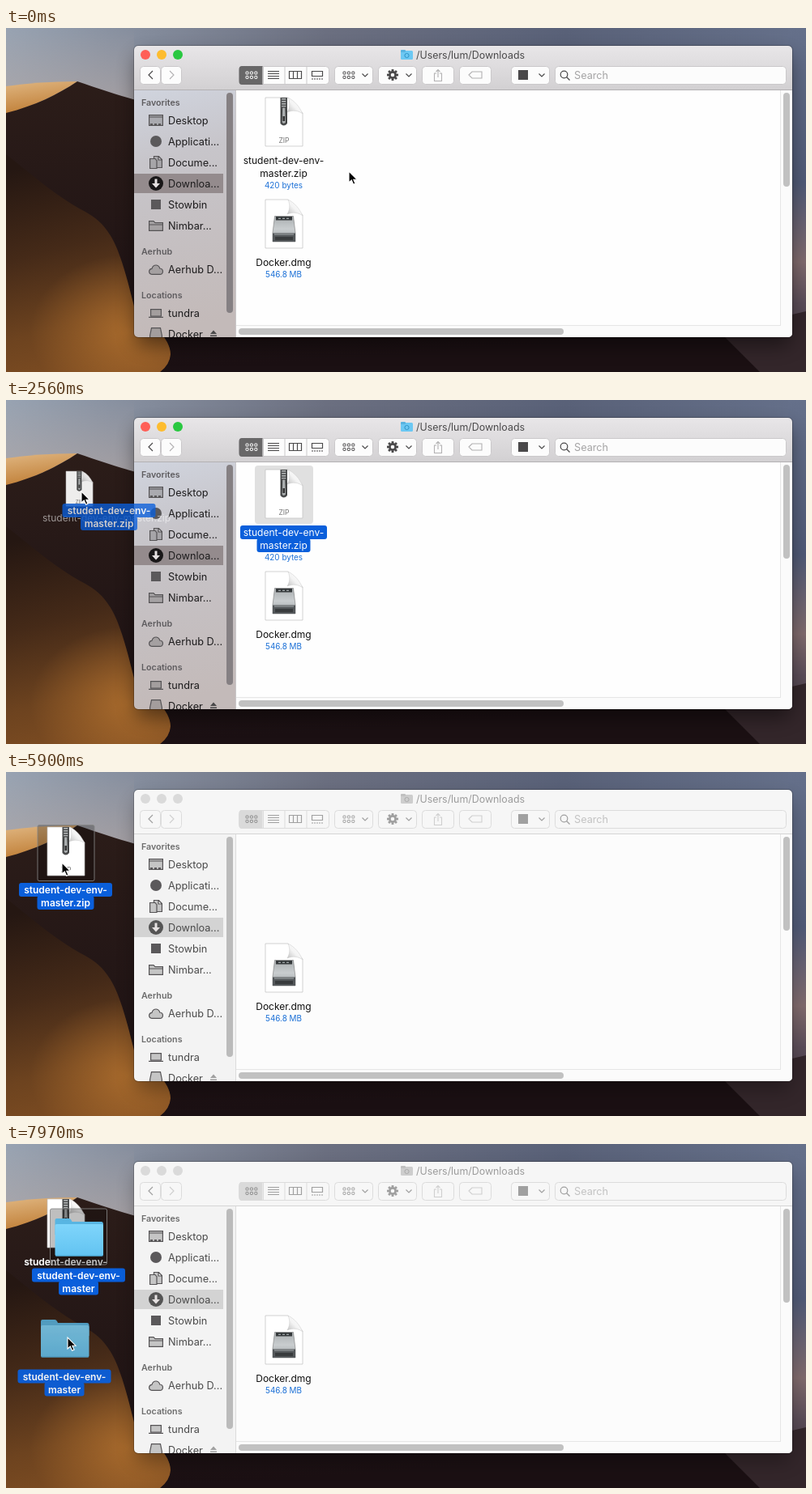
Animation, 987 px wide and 425 px high, one loop 8000 ms. Source, as an HTML page:

```html
<!DOCTYPE html>
<html lang="en">
<head>
<meta charset="utf-8">
<title>Unpacking a zip file</title>
<style>
html, body { margin: 0; width: 100%; height: 100%; overflow: hidden; background: #1c1114; }
svg { display: block; width: 987px; height: 425px; font-family: Inter, "Noto Sans", sans-serif;
  --bar: url(#bar); --line: #b3b1b3; --btn: #fcfcfc; --edge: #cac8ca; --seg: #686768; --segInk: #fff;
  --ink: #4a494a; --dim: #b2b1b2; --title: #4b4a4b; --side: url(#side); --row: #948b8d; --thumb: #858083;
  --item: #1d1c1d; --head: #5e5c5f; --page: #fefefe; --hint: #a5a4a5; }
svg.idle { --bar: #f6f6f6; --line: #d5d5d5; --btn: #f7f7f7; --edge: #dcdcdc; --seg: #dadada; --segInk: #8d8d8d;
  --ink: #a0a0a0; --dim: #cfcfcf; --title: #9c9c9c; --side: #f3f3f3; --row: #d3d3d3; --thumb: #bbb;
  --item: #4b4b4b; --head: #6c6c6c; --page: #fcfcfc; --hint: #c3c3c3; }
.btn { fill: var(--btn); stroke: var(--edge); }
.ink { fill: var(--ink); }
.pen { fill: none; stroke: var(--ink); stroke-width: 1.2; }
.pale { fill: none; stroke: var(--dim); stroke-width: 1.1; }
.item { font-size: 12.7px; fill: var(--item); }
.head { font-size: 10.7px; font-weight: 600; fill: var(--head); }
.glyph { fill: #5b595b; fill-opacity: .3; stroke: #555355; stroke-width: 1.2; }
.solid { fill: #5b595b; }
.name { font-size: 12px; text-anchor: middle; fill: #111; }
.desk { font-size: 12px; font-weight: 600; fill: #fff; }
.info { font-size: 9.9px; text-anchor: middle; fill: #1a6fd6; }
</style>
</head>
<body>
<svg id="stage" viewBox="0 0 987 425">
<defs>
  <linearGradient id="sky"><stop stop-color="#98a3b2"/><stop offset=".18" stop-color="#838b9b"/><stop offset=".4" stop-color="#6b6f80"/><stop offset=".7" stop-color="#596178"/><stop offset="1" stop-color="#65708a"/></linearGradient>
  <linearGradient id="haze" x2="0" y2="1"><stop stop-color="#b5a8a4" stop-opacity="0"/><stop offset="1" stop-color="#b5a8a4" stop-opacity=".6"/></linearGradient>
  <linearGradient id="dusk" x2="0" y2="1"><stop stop-color="#65708a"/><stop offset=".45" stop-color="#505a76"/><stop offset=".68" stop-color="#806a6c"/><stop offset=".8" stop-color="#5b4d58"/><stop offset="1" stop-color="#3a2d32"/></linearGradient>
  <linearGradient id="lit" x2=".3" y2="1"><stop stop-color="#e0b681"/><stop offset="1" stop-color="#c07f37"/></linearGradient>
  <linearGradient id="slope" x2=".2" y2="1"><stop stop-color="#2c1d19"/><stop offset="1" stop-color="#1b1013"/></linearGradient>
  <linearGradient id="sand" x1=".4" x2=".6" y2="1"><stop stop-color="#251712"/><stop offset=".4" stop-color="#452a18"/><stop offset=".75" stop-color="#6d431f"/><stop offset="1" stop-color="#7e4d22"/></linearGradient>
  <radialGradient id="shine"><stop stop-color="#b87530" stop-opacity=".75"/><stop offset="1" stop-color="#b87530" stop-opacity="0"/></radialGradient>
  <linearGradient id="bar" x2="0" y2="1"><stop stop-color="#e8e6e8"/><stop offset="1" stop-color="#d2d0d2"/></linearGradient>
  <linearGradient id="side" x2=".1" y2="1"><stop stop-color="#d0d4de"/><stop offset=".3" stop-color="#c7c5ca"/><stop offset="1" stop-color="#c3bab9"/></linearGradient>
  <linearGradient id="curl" x1="1" y1="0" x2="0" y2="1"><stop stop-color="#fff"/><stop offset=".55" stop-color="#f4f4f4"/><stop offset="1" stop-color="#bcbcbc"/></linearGradient>
  <linearGradient id="metal" x2="0" y2="1"><stop stop-color="#a9aeb0"/><stop offset=".5" stop-color="#c9cdcf"/><stop offset="1" stop-color="#9ba0a2"/></linearGradient>
  <linearGradient id="front" x2="0" y2="1"><stop stop-color="#7fd5fb"/><stop offset="1" stop-color="#62c3f1"/></linearGradient>
  <filter id="soft" x="-20%" y="-20%" width="140%" height="150%"><feGaussianBlur stdDeviation="12"/></filter>
  <filter id="glow" x="-20%" y="-40%" width="140%" height="180%"><feDropShadow dx="0" dy="1" stdDeviation="1" flood-opacity=".8"/></filter>
  <clipPath id="frame"><rect x="158" y="22" width="812" height="360" rx="5"/></clipPath>
  <clipPath id="dune"><path id="duneShape" d="M0 156C28 178 62 208 96 226S140 270 158 344C180 364 203 384 203 403Q202 416 190 425H0Z"/></clipPath>
  <g id="paper">
    <path d="M0 0H28L46 19V60H0Z" fill="#fff" stroke="#bfbfbf" stroke-width=".7"/>
    <path d="M28 0C31 7 30 13 27 18C34 15 41 16 46 20C42 11 36 4 28 0Z" fill="url(#curl)" stroke="#c8c8c8" stroke-width=".5"/>
  </g>
  <g id="zip">
    <use href="#paper"/>
    <path d="M18.500 0H27V32Q22.700 37 18.500 32Z" fill="#4a4c4d"/>
    <path d="M22.700 1V14" stroke="#b9bcbd" stroke-width="5" stroke-dasharray="1.4 1.6"/>
    <path d="M20.700 12H24.800L25.500 31Q22.700 34 20 31Z" fill="#a9adae" stroke="#222" stroke-width=".8"/>
    <rect x="21.500" y="23" width="2.500" height="6" fill="#333"/>
    <text x="23" y="55.500" font-size="8.500" text-anchor="middle" fill="#777">ZIP</text>
  </g>
  <g id="disk">
    <use href="#paper"/>
    <path d="M11.500 20.500H34.500L37 41V52H9V41Z" fill="url(#metal)" stroke="#777" stroke-width=".6"/>
    <rect x="13" y="21" width="20" height="4.500" fill="#34383a"/>
    <path d="M16 23.300H30" stroke="#b9c0c2" stroke-dasharray="3 2"/>
    <path d="M9 41.500H37V52H9Z" fill="#53575a"/><path d="M11 43H35" stroke="#a4a9ab"/><path d="M12 48H34" stroke="#383b3d" stroke-width="4"/>
  </g>
  <g id="folder">
    <path d="M0 6V2Q0 0 2 0H17Q19 0 20 2L21 4H57Q59.500 4 59.500 7V20H0Z" fill="#58b5e2"/>
    <path d="M0 9Q0 7 2 7H57.500Q59.500 7 59.500 9V44.500Q59.500 46.500 57.500 46.500H2Q0 46.500 0 44.500Z" fill="url(#front)"/>
    <path d="M.5 46H59" stroke="#4ba9d8"/>
  </g>
  <path id="chev" d="M-3.500 -1.500L0 2L3.500 -1.500"/>
</defs>

<g id="wall"></g>
<g id="desk">
  <g id="zipItem"></g>
  <g id="dirItem"></g>
</g>
<rect id="shadow" x="160" y="34" width="808" height="358" rx="8" fill="#000" filter="url(#soft)"/>
<g id="win" clip-path="url(#frame)"></g>
<rect x="157.500" y="21.500" width="813" height="361" rx="5.500" fill="none" stroke="#000" stroke-opacity=".22"/>
<use id="zoom" href="#zip"/>
<g id="ghost">
  <text id="flat" class="desk" style="font-weight:400"></text>
  <use id="ghostIcon" href="#zip"/>
  <g id="ghostName" opacity=".85"></g>
</g>
<g id="dirGhost"></g>
<path id="mouse" d="M0 0V14L3.300 11L5.600 16.300L8 15.200L5.800 10.200H10Z" fill="#000" stroke="#fff" stroke-width="1.100"/>
</svg>

<script>
const $ = id => document.getElementById(id);
const text = (x, y, cls, s) => `<text x="${x}" y="${y}" class="${cls}">${s}</text>`;
const path = (cls, d) => `<path class="${cls}" d="${d}"/>`;
const rect = (x, y, w, h, fill, r = 0) => `<rect x="${x}" y="${y}" width="${w}" height="${h}" rx="${r}" style="fill:${fill}"/>`;
const use = (id, x, y) => `<use href="#${id}" x="${x}" y="${y}"/>`;
const BLUE = "#0a5fdb", HEAD = "student-dev-env-";

// Two-line file name; widths are those of the highlight behind each line.
function label(tail, cx, top, cls, fill, w1, w2) {
  const back = fill ? rect(cx - w1 / 2, top, w1, 17, fill, 3) + rect(cx - w2 / 2, top + 16, w2, 17, fill, 3) : "";
  const glow = fill ? "" : ' filter="url(#glow)"';
  const style = fill ? "fill:#fff" : "";
  return `${back}<g${cls.includes("desk") ? glow : ""}><text class="${cls}" style="${style}" x="${cx}" y="${top + 13}">${HEAD}</text>` +
    `<text class="${cls}" style="${style}" x="${cx}" y="${top + 29}">${tail}</text></g>`;
}
const pick = (x, y) => `<rect x="${x}" y="${y}" width="70" height="69" rx="2" fill="#000" fill-opacity=".25" stroke="#858585" stroke-opacity=".85"/>`;

function wall() {
  return rect(0, 0, 987, 425, "url(#sky)") + rect(0, 0, 158, 90, "url(#haze)") + rect(965, 0, 22, 425, "url(#dusk)") +
    `<path d="M0 72Q40 66 88 66C64 82 36 96 0 106Z" fill="url(#lit)"/>
     <path d="M0 105C36 96 64 82 88 66C112 74 138 83 160 89C400 180 700 330 987 402V425H0Z" fill="url(#slope)"/>
     <path d="M880 375L987 350V425H930Z" fill="#33262a"/>
     <use href="#duneShape" fill="url(#sand)"/>
     <g clip-path="url(#dune)"><ellipse cx="150" cy="375" rx="120" ry="95" fill="url(#shine)"/></g>`;
}

function grid(x, y, color) {
  let s = "";
  for (let i = 0; i < 6; i++)
    s += `<rect x="${x + i % 3 * 5.4}" y="${y + (i > 2) * 5.4}" width="3" height="3" rx=".5" style="fill:none;stroke:${color}"/>`;
  return s;
}

function toolbar() {
  const button = (x, w) => `<rect class="btn" x="${x + .5}" y="47.5" width="${w - 1}" height="22" rx="4"/>`;
  const lights = ["#ff5f57", "#fdbc2f", "#29c840"].map((c, i) =>
    `<circle class="light" cx="${172 + i * 20}" cy="33" r="6" fill="${c}"/>`).join("");
  let gear = "";
  for (let a = 0; a < 360; a += 45) gear += `<rect class="ink" x="475.600" y="51" width="2.800" height="4" transform="rotate(${a} 477 58)"/>`;
  return rect(158, 22, 812, 55, "var(--bar)") + rect(158, 76, 812, 1, "var(--line)") + lights +
    `<g id="badge">${rect(487, 28, 15, 11, "#6cc8f3", 1.5)}${rect(487, 27, 6, 3, "#58b3e0", 1)}<circle cx="494.500" cy="34" r="2.600" fill="none" stroke="#2f93c6"/></g>` +
    `<text x="506" y="37.800" font-size="12.400" style="fill:var(--title)">/Users/lum/Downloads</text>` +
    [[165, 26], [191, 26], [287, 112], [405, 48], [459, 48], [513, 40], [559, 40], [623, 48], [677, 286]].map(b => button(...b)).join("") +
    path("pen", "M181 53L176 58L181 63") + path("pale", "M202 53L207 58L202 63") +
    `<path d="M291 47H316.500V70H291Q287.500 70 287.500 66V51Q287.500 47 291 47Z" style="fill:var(--seg)"/>` + grid(296, 54, "var(--segInk)") +
    [317, 343.5, 370.5].map(x => rect(x, 48, 1, 21, "var(--edge)")).join("") +
    path("pen", "M323 53.500H337M323 56.500H337M323 59.500H337M323 62.500H337M349.500 53.500H364.500V62.500H349.500ZM354.500 53V63M359.500 53V63M377.500 53.500H390.500V59.500H377.500Z") +
    `<path class="pen" d="M377 63H391" stroke-dasharray="2 1"/>` +
    grid(416, 54, "var(--ink)") +
    [443, 497, 661].map(x => `<use href="#chev" x="${x}" y="58" class="pen"/>`).join("") +
    gear + `<circle cx="477" cy="58" r="3.600" class="pen" style="stroke-width:2.6"/>` +
    path("pale", "M531 56H528.500V65.500H537.500V56H535M533 61V51.500M530.500 54L533 51.500L535.500 54M571 58L575 54H587V62H575Z") +
    rect(632, 52, 12, 12, "var(--ink)") +
    `<circle cx="688.500" cy="57.500" r="4.300" class="pen"/>` + path("pen", "M691.500 60.500L695.500 64.500") +
    `<text x="701" y="62.800" font-size="12.700" style="fill:var(--hint)">Search</text>`;
}

function sidebar() {
  const rows = [["Desktop", 119], ["Applicati...", 145], ["Docume...", 171], ["Downloa...", 197], ["Stowbin", 223], ["Nimbar...", 249],
    ["Aerhub D...", 303], ["tundra", 357], ["Docker", 383]];
  return rect(158, 77, 125, 305, "var(--side)") + rect(158, 180, 110, 24, "var(--row)") + rect(283, 77, 1, 305, "var(--edge)") +
    [["Favorites", 96], ["Aerhub", 280], ["Locations", 334]].map(h => text(167, h[1], "head", h[0])).join("") +
    rows.map(r => text(200, r[1], "item", r[0])).join("") +
    path("glyph", "M176.600 107.600H193.400V120.400H176.600ZM177 110H193") +
    path("solid", "M178 118H181V120H178ZM183 118H186V120H183ZM188 118H191V120H188Z") +
    `<circle cx="185" cy="140" r="7" class="solid"/>` +
    path("glyph", "M177.600 161.500H184L186 164V173.500H177.600ZM182.500 161V158.500H188.500L192.400 162.500V172.500H186M188 159V163H192") +
    `<circle id="downDot" cx="185" cy="192" r="9"/><path d="M183.500 186.500H186.500V192H190L185 197.500L180 192H183.500Z" fill="#e6e2e2"/>` +
    rect(179, 212, 12, 12, "#5b595b") +
    path("glyph", "M176.600 250.400V238.600H182L184 240.600H193.400V250.400ZM177 243H193") +
    path("glyph", "M180 304.400Q176.600 304 176.600 300.500Q177 297.500 180 297.300Q181 292.800 185.500 293Q189 293.500 189.700 297Q193.500 297.300 193.500 301Q193 304.400 190 304.400Z") +
    path("glyph", "M178.600 347.600H191.400V356H178.600ZM176 357.300H194") +
    path("glyph", "M179.500 370.600H190.500L192.400 380V388H177.600V380Z") +
    `<path d="M252 378L256 373.500L260 378ZM252 379.500H260V381H252Z" style="fill:var(--ink)"/>` +
    rect(272, 80, 8, 272, "var(--thumb)", 4);
}

function content() {
  return rect(284, 77, 686, 305, "var(--page)") + rect(955, 77, 15, 305, "#fbfbfb") + rect(284, 367, 686, 15, "#fbfbfb") +
    rect(955, 77, 1, 290, "#e6e6e6") + rect(284, 367, 672, 1, "#e6e6e6") +
    rect(959, 80, 8, 116, "#c1c1c1", 4) + rect(287, 371, 401, 8, "#c1c1c1", 4) +
    use("disk", 320, 212) + text(342.5, 294, "name", "Docker.dmg") + text(342.5, 308, "info", "546.8 MB") +
    `<g id="file"><rect id="fileBox" x="307" y="81" width="72" height="72" rx="4" fill="#e0e0e0"/>${use("zip", 320, 86)}` +
    `<g id="plain">${label("master.zip", 342.5, 155, "name", "", 0, 0)}</g><g id="chosen">${label("master.zip", 342.5, 155, "name", BLUE, 107, 66)}</g>` +
    text(342.5, 198, "info", "420 bytes") + `</g>`;
}

const zipState = fill => (fill ? pick(39, 65.5) : "") + use("zip", 51, 68) + label("master.zip", 73.5, 137, "name desk", fill, 115, 70);
const dirState = fill => (fill ? pick(54.5, 80) : "") + use("folder", 60.5, 92) + label("master", 89.5, 153.5, "name desk", fill, 115, 49);
const states = (id, list) => $(id).innerHTML = list.map(s => `<g>${s}</g>`).join("");

$("wall").innerHTML = wall();
$("win").innerHTML = content() + sidebar() + toolbar();
states("zipItem", [zipState("#56504f"), zipState(BLUE), zipState("")]);
states("dirItem", [dirState(""), dirState(BLUE)]);
$("flat").textContent = HEAD + "master.zip";
$("ghostName").innerHTML = label("master.zip", 0, 0, "name desk", BLUE, 115, 70);
$("dirGhost").innerHTML = `<g opacity=".88">${use("folder", -34, -22)}</g>${label("master", -5, 39.5, "name desk", BLUE, 115, 49)}`;

// Rows are time, then values; a smooth curve runs through them.
const mousePath = [[420, 423, 177], [750, 373, 143], [1100, 339, 122], [1760, 339, 122], [1960, 290, 129], [2560, 93, 113], [2610, 93, 113],
  [2900, 72, 125], [3200, 69, 122], [4600, 69, 122], [4770, 69, 119], [5190, 69, 119], [5480, 69, 112], [6500, 69, 112], [7180, 91, 112],
  [7350, 91, 112], [7800, 72, 241], [7970, 76, 239]];
// Offsets from the pointer: icon x, y, scale, name x, y.
const carry = [[2200, -19, -36, 1, 3, 33], [2560, -19, -25, .72, 34, 15], [2610, -19, -25, .72, 34, 15], [2950, -18, -54, 1, 4.5, 15]];
const ghostFade = [[1900, 0], [1960, .92], [3150, .92], [3260, 0]];
const flatFade = [[2300, 0], [2560, .6], [2610, .6], [2850, 0]];
const fileFade = [[3500, 1], [3700, 0]];
const zipFade = [[4655, 0], [4770, 1]];
const dirFade = [[6760, 0], [6880, 1]];
const zoomFade = [[6430, .6, 1], [6740, 0, 2.95]];

function at(rows, t) {
  const last = rows.length - 1, i = rows.findIndex(r => r[0] > t);
  if (i === 0) return rows[0].slice(1);
  if (i < 0) return rows[last].slice(1);
  const slope = (j, k) => j < 0 || j >= last ? 0 : (rows[j + 1][k] - rows[j][k]) / (rows[j + 1][0] - rows[j][0]);
  // Speed at a row: zero at rests and turns, else between its two neighbours.
  const speed = (j, k) => {
    const a = slope(j - 1, k), b = slope(j, k);
    return a * b > 0 ? 2 * a * b / (a + b) : 0;
  };
  const [a, b] = [rows[i - 1], rows[i]], d = b[0] - a[0], p = (t - a[0]) / d, q = 1 - p;
  return a.slice(1).map((v, n) => {
    const k = n + 1;
    return v * q * q * (1 + 2 * p) + b[k] * p * p * (1 + 2 * q) + d * p * q * (q * speed(i - 1, k) - p * speed(i, k));
  });
}
const show = (node, on) => node.style.display = on ? "" : "none";
const fade = (id, v) => { $(id).setAttribute("opacity", v); show($(id), v > 0); };
const move = (id, x, y, s = 1) => $(id).setAttribute("transform", `translate(${x} ${y}) scale(${s})`);
const only = (id, n) => [...$(id).children].forEach((c, i) => show(c, i === n));

function draw(t) {
  const idle = t >= 5900, chosen = t >= 1340;
  $("stage").setAttribute("class", idle ? "idle" : "");
  $("shadow").setAttribute("opacity", idle ? .3 : .45);
  document.querySelectorAll(".light").forEach(c => c.style.fill = idle ? "#dadada" : "");
  $("badge").style.filter = idle ? "grayscale(1) opacity(.65)" : "";
  $("downDot").style.fill = idle ? "#555" : "#191718";

  show($("fileBox"), chosen);
  show($("plain"), !chosen);
  show($("chosen"), chosen);
  fade("file", at(fileFade, t)[0]);

  const [mx, my] = at(mousePath, t);
  move("mouse", mx, my);

  const [ix, iy, s, nx, ny] = at(carry, t);
  fade("ghost", at(ghostFade, t)[0]);
  fade("flat", at(flatFade, t)[0]);
  move("flat", mx + 31, my + 37);
  move("ghostIcon", mx + ix, my + iy, s);
  move("ghostName", mx + nx, my + ny);

  fade("zipItem", at(zipFade, t)[0]);
  only("zipItem", t < 5900 ? 0 : t < 7350 ? 1 : 2);
  fade("dirItem", at(dirFade, t)[0]);
  only("dirItem", t < 7350 ? 0 : 1);

  const [za, zs] = at(zoomFade, t);
  fade("zoom", t < 6430 ? 0 : za);
  move("zoom", 74 - 23 * zs, 98 - 30 * zs, zs);

  fade("dirGhost", t < 7400 ? 0 : .95);
  move("dirGhost", mx + 1, my);
}

$("flat").setAttribute("text-anchor", "middle");
const start = performance.now();
function tick() {
  draw((performance.now() - start) % 8000);
  requestAnimationFrame(tick);
}
tick();
</script>
</body>
</html>
```
